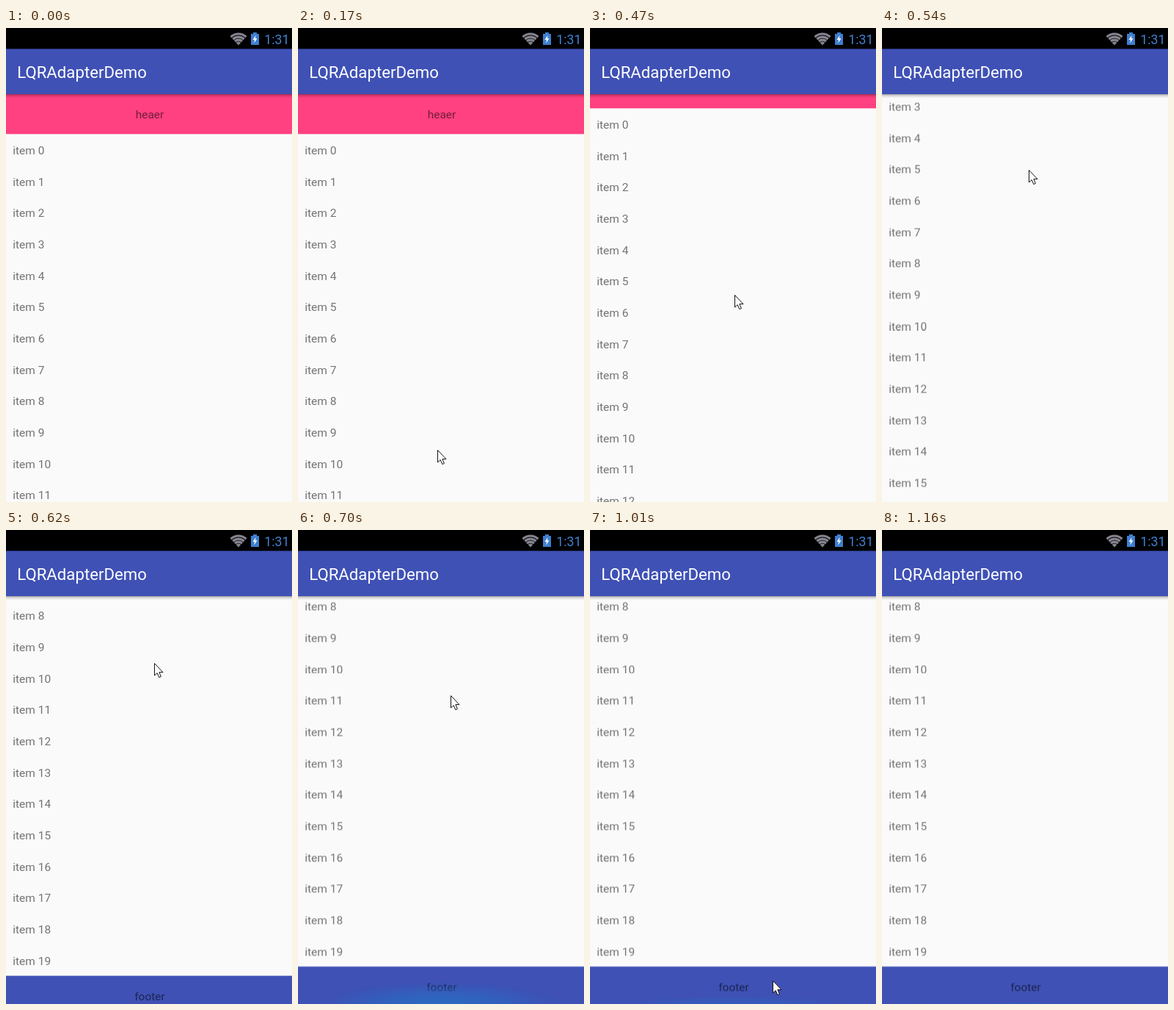
Recreate the animation shown at these times as an HTML page. Size 390 by 645 pixels, loop 1.62 s.

```html
<!DOCTYPE html>
<html lang="en">
<head>
<meta charset="utf-8">
<title>List demo</title>
<style>
html, body { margin: 0; width: 100%; height: 100%; overflow: hidden; background: #fafafa; }
svg { display: block; width: 390px; height: 645px; font-family: Roboto, "Noto Sans", sans-serif; }
.list text { font-size: 15.5px; fill: #000; fill-opacity: .54; }
.mid { text-anchor: middle; }
.list, .cursor, .glow { animation: 1620ms step-end infinite; }
.list { animation-name: scroll; }
.cursor { animation-name: point; }
.glow { animation-name: glow; transform-origin: 195px 646px; }

@keyframes scroll {
  0% { transform: translateY(0); }
  28.97% { transform: translateY(-35px); }
  33.29% { transform: translateY(-187.5px); }
  38.23% { transform: translateY(-391px); }
  43.17%, 100% { transform: translateY(-403.6px); }
}
@keyframes point {
  0% { transform: translate(186px, 660px); }
  4.28% { transform: translate(188px, 630px); }
  9.22% { transform: translate(190px, 574px); }
  14.15% { transform: translate(192px, 518px); }
  19.09% { transform: translate(194px, 479px); }
  24.03% { transform: translate(195px, 463.5px); }
  28.97% { transform: translate(197px, 363px); }
  33.29% { transform: translate(200px, 193px); }
  38.23% { transform: translate(202px, 181px); }
  43.17% { transform: translate(208px, 225px); }
  48.1% { transform: translate(219px, 343px); }
  52.42% { transform: translate(231px, 473px); }
  57.36% { transform: translate(242px, 573px); }
  62.3% { transform: translate(249px, 613px); }
  66.62% { transform: translate(254px, 641px); }
  71.56%, 100% { transform: translate(258px, 670px); }
}
@keyframes glow {
  0% { transform: scaleY(0); opacity: 0; }
  43.17% { transform: scaleY(1.3); opacity: .9; }
  48.1% { transform: scaleY(1.5); opacity: 1; }
  52.42% { transform: scaleY(1.25); opacity: .95; }
  57.36% { transform: scaleY(1); opacity: .85; }
  62.3% { transform: scaleY(.5); opacity: .5; }
  66.62%, 100% { transform: scaleY(.15); opacity: .3; }
}
</style>
</head>
<body>
<svg viewBox="0 0 390 645">
  <defs>
    <linearGradient id="shade" x2="0" y2="1">
      <stop offset="0" stop-opacity=".36"/>
      <stop offset=".4" stop-opacity=".13"/>
      <stop offset="1" stop-opacity="0"/>
    </linearGradient>
    <radialGradient id="light">
      <stop offset="0" stop-color="#2a6dc2"/>
      <stop offset=".4" stop-color="#2a6dc2" stop-opacity=".75"/>
      <stop offset="1" stop-color="#2a6dc2" stop-opacity="0"/>
    </radialGradient>
    <clipPath id="fan"><path d="M317 23.5L304 9.5V4H330V9.5Z"/></clipPath>
  </defs>

  <rect width="390" height="645" fill="#fafafa"/>
  <g class="list" id="list">
    <rect y="90" width="390" height="54.3" fill="#ff4081"/>
    <text class="mid" x="196" y="123.3">heaer</text>
    <rect y="997.6" width="390" height="54" fill="#3f51b5"/>
    <text class="mid" x="196" y="1031">footer</text>
  </g>
  <ellipse class="glow" cx="195" cy="646" rx="165" ry="24" fill="url(#light)"/>

  <rect y="90" width="390" height="5.5" fill="url(#shade)"/>
  <rect y="28" width="390" height="62" fill="#3f51b5"/>
  <text x="15.2" y="68.3" font-size="22.2" fill="#fff">LQRAdapterDemo</text>

  <rect width="390" height="28.4" fill="#000"/>
  <g clip-path="url(#fan)" fill="none" stroke="#85858f" stroke-width="3.2">
    <circle cx="317" cy="23" r="15"/>
    <circle cx="317" cy="23" r="10.8"/>
    <circle cx="317" cy="23" r="6.8"/>
    <circle cx="317" cy="23" r="2.2" stroke-width="4.4"/>
  </g>
  <path d="M337 6H342V8H345V23H334V8H337Z" fill="#3f7fd0"/>
  <path d="M340.5 10L336.5 16H339L338.3 20.5L342.6 14.2H340Z" fill="#fff"/>
  <text x="352.2" y="21.5" font-size="17.8" fill="#3f7fd0">1:31</text>

  <path class="cursor" d="M.5 .5V17L4.2 13.6L6.8 19.6L9.4 18.5L6.9 12.6H12Z" fill="#fff" stroke="#111" stroke-width="1"/>
</svg>
<script>
const list = document.getElementById('list');
for (let i = 0; i < 20; i++) {
  const row = document.createElementNS('http://www.w3.org/2000/svg', 'text');
  row.setAttribute('x', 9.2);
  row.setAttribute('y', 172 + i * 42.67);
  row.textContent = 'item ' + i;
  list.append(row);
}
</script>
</body>
</html>
```
